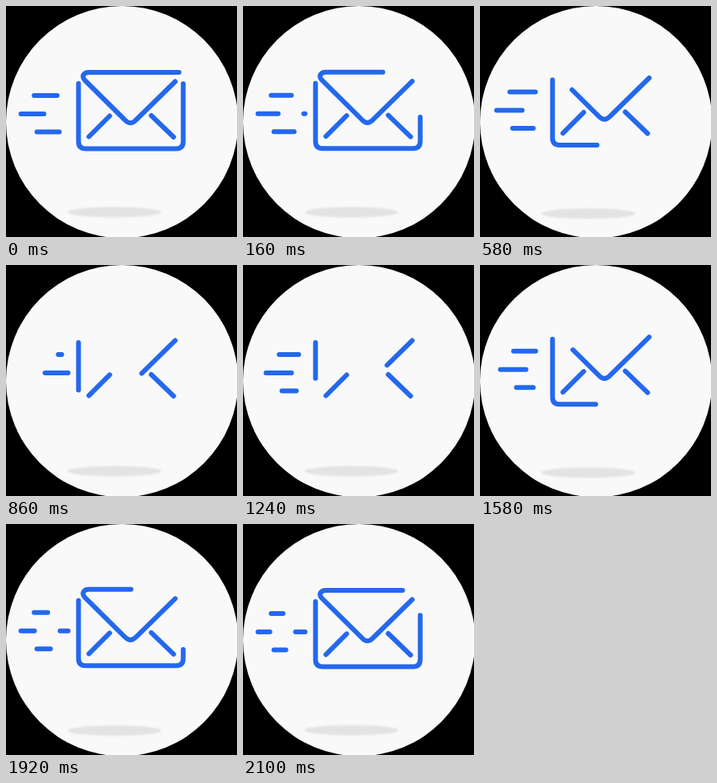
Write an HTML page that moves like this. It is 289 by 289 pixels and loops after 2.12 s.

```html
<!DOCTYPE html>
<html lang="en">
<head>
<meta charset="utf-8">
<title>Sending mail</title>
<style>
  html, body { margin: 0; width: 100%; height: 100%; overflow: hidden; background: #000; }
  svg { display: block; width: 100vw; height: 100vh; }
  #mail { fill: none; stroke: #2468ee; stroke-width: 6; stroke-linecap: round; stroke-linejoin: round; }
</style>
</head>
<body>
<svg viewBox="0 0 289 289">
  <defs>
    <filter id="soft" x="-10%" y="-50%" width="120%" height="200%"><feGaussianBlur stdDeviation="1.2"/></filter>
  </defs>
  <circle cx="145.200" cy="145.200" r="145.200" fill="#f9f9f9"/>
  <ellipse id="shadow" cx="135.5" rx="58.5" ry="6.5" fill="#e3e3e3" filter="url(#soft)"/>
  <g id="mail">
    <path d="M104 164L130 138M182 137.500L210 164.500"/>
    <path class="trim" pathLength="1" d="M91 97.500V170Q91 179 100 179H213Q222 179 222 170V97.500"/>
    <path class="trim" pathLength="1" d="M212 95L163 143Q156 150.500 149 143L99 93.500C94 88 98 83.500 104 83.500H217"/>
    <path class="speed" d="M35.500 112.500H70"/>
    <path class="speed" d="M19 135.500H78"/>
    <path class="speed" d="M39 158H67"/>
  </g>
</svg>
<script>
const LOOP = 2120, DASH = 32;
// Playhead in ms: runs forward, then back.
const KEYS = [[0, 0], [340, 338], [860, 860], [1078, 1076], [1240, 918], [1580, 587], [1920, 232], [2100, 66], [2120, 47]];
const mail = document.getElementById('mail');
const shadow = document.getElementById('shadow');
const trims = document.querySelectorAll('.trim');
const speeds = document.querySelectorAll('.speed');

function playhead(t) {
  const i = Math.max(1, KEYS.findIndex(k => k[0] > t));
  const [t0, s0] = KEYS[i - 1], [t1, s1] = KEYS[i];
  return s0 + (s1 - s0) * (t - t0) / (t1 - t0);
}

function draw(now) {
  const s = playhead(now % LOOP);
  const drawn = 1 - s / 1086;
  const lift = 6.2 * ((1 + Math.cos(2 * Math.PI * (s - 470) / 1060)) / 2) ** 3;
  const shift = (0.783 * s - 4) % (2 * DASH);

  mail.setAttribute('transform', `translate(-0.3 ${-0.5 - lift})`);
  shadow.setAttribute('cy', 258 + lift * 0.4);
  trims.forEach(p => p.setAttribute('stroke-dasharray', `${drawn} 2`));
  speeds.forEach(p => {
    p.setAttribute('stroke-dasharray', `${DASH} ${DASH}`);
    p.setAttribute('stroke-dashoffset', -shift);
  });
  requestAnimationFrame(() => draw(performance.now()));
}
draw(0);
</script>
</body>
</html>
```
